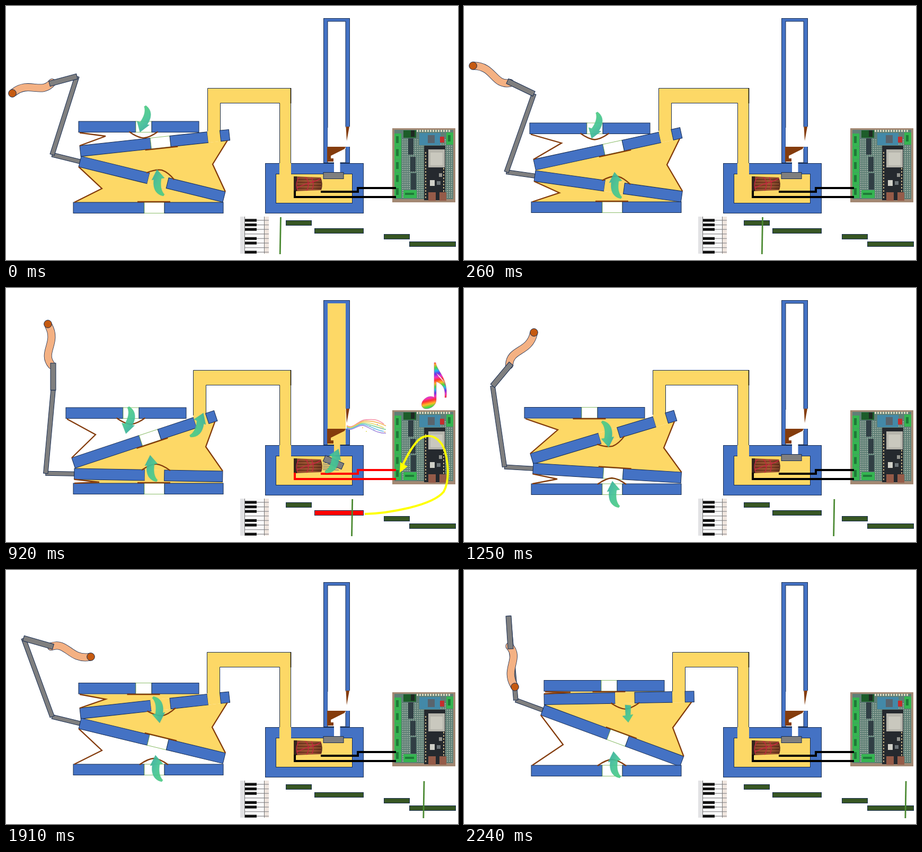
An HTML page that plays this animation: 853 px wide and 480 px high, repeating every 2.57 s.

```html
<!DOCTYPE html>
<html lang="en">
<head>
<meta charset="utf-8">
<title>Crank organ</title>
<style>
html, body { margin: 0; width: 100%; height: 100%; overflow: hidden; background: #fff; }
svg { display: block; width: 853px; height: 480px; }
</style>
</head>
<body>
<svg id="stage" viewBox="0 0 853 480" xmlns="http://www.w3.org/2000/svg"></svg>
<script>
const AIR = '#fdd866', BLUE = '#4472c4', NAVY = '#172c51', BROWN = '#843c0c', GRAY = '#7f7f7f';
const LOOP = 2570, FIRST = 260, STEP = 330, THICK = 20.5;

// Board poses are [left, top, angle]; folds are the inner tips of the bellows.
const poses = [
  { top: [137, 218], upper: [139, 264, -6.2], middle: [142, 284, 13.8], base: 371,
    folds: [[188, 246], [390, 299], [181, 345]], arm: [82, 147, 134, 133], knob: [12, 165],
    arrows: [[262, 215, 206], [287, 334, 0]] },
  { top: [124, 221], upper: [131, 290, -12.3], middle: [135, 311, 8], base: 370,
    folds: [[184, 259], [383, 300], [180, 353]], arm: [82, 142, 132, 166], knob: [17, 113],
    arrows: [[250, 227, 206], [286, 339, 0]] },
  { top: [114, 223.5], upper: [125, 311, -16.7], middle: [131, 330, 3.6], base: 369,
    folds: [[181, 270], [378, 300], [177, 360]], arm: [82, 140, 118, 188], knob: [42, 81],
    arrows: [[240, 238, 200], [285, 344, 0], [369, 266, 15, 1]] },
  { top: [113, 226], upper: [124, 321, -18.4], middle: [129, 341, 1], base: 369,
    folds: [[169, 277], [377, 300], [176, 367]], arm: [89, 142, 89, 193], knob: [79, 68],
    arrows: [[233, 251, 200], [274, 341, 0], [364, 260, 15, 1]] },
  { top: [114, 225.5], upper: [125, 313, -16.8], middle: [131, 331, 3.5], base: 370,
    folds: [[177, 268], [377, 302], [176, 361]], arm: [89, 143, 54, 185], knob: [132, 84],
    arrows: [[271, 276, 180], [282, 390, 0]] },
  { top: [123, 221], upper: [130, 291, -12.4], middle: [134, 311, 8], base: 368,
    folds: [[183, 257], [383, 299], [180, 352]], arm: [89, 144, 36, 169], knob: [153, 110],
    arrows: [[280, 270, 180], [283, 382, 0]] },
  { top: [137, 213.5], upper: [139, 261, -6.3], middle: [142, 280, 13.6], base: 367,
    folds: [[188, 244], [389, 297], [181, 341]], arm: [89, 145, 33, 129], knob: [160, 164],
    arrows: [[288, 264, 180], [284, 375, 0]] },
  { top: [151, 208.5], upper: [151, 234, -1], middle: [152, 255, 20.3], base: 369,
    folds: [[201, 231], [394, 298], [187, 330]], arm: [88, 149, 84, 87], knob: [96, 221],
    arrows: [[309, 271, 0, 0, 1], [284, 368, 0]] }
];

const rect = (x, y, w, h, fill, extra = '') =>
  `<rect x="${x}" y="${y}" width="${w}" height="${h}" fill="${fill}" ${extra}/>`;
const path = (d, fill = 'none', stroke = 'none', width = 1, extra = '') =>
  `<path d="${d}" fill="${fill}" stroke="${stroke}" stroke-width="${width}" ${extra}/>`;
const group = (transform, content) => `<g transform="${transform}">${content}</g>`;
const line = points => 'M' + points.map(p => p.join()).join('L');
const outlined = `stroke="${NAVY}"`;
const times = (n, make) => Array.from({ length: n }, (_, i) => make(i)).join('');

// A point given in board coordinates, placed on the stage.
function at([x, y, angle = 0], along, down) {
  const a = angle * Math.PI / 180, c = Math.cos(a), s = Math.sin(a);
  return [x + along * c - down * s, y + along * s + down * c];
}

// gaps: [start, end, holds air]
function board([x, y, angle = 0], length, gaps, flap) {
  let out = '', from = 0;
  for (const [start, end, air] of gaps) {
    out += rect(from, 0, start - from, THICK, BLUE, outlined);
    out += rect(start, 0, end - start, THICK, air ? AIR : '#fff', air ? '' : 'stroke="#70ad47" stroke-width=".8"');
    from = end;
  }
  out += rect(from, 0, length - from, THICK, BLUE, outlined);
  return group(`translate(${x} ${y}) rotate(${angle})`, out + flap);
}

// side is 1 for a flap below its board and -1 for one above.
function flap(center, side, open) {
  const y = side > 0 ? THICK + 1 : -1, edge = y - side * 2, bend = y + side * 9, tip = y + side * 10;
  const d = open
    ? `M${center - 27} ${edge}Q${center - 12} ${bend} ${center} ${tip}Q${center + 12} ${bend} ${center + 27} ${edge}`
    : `M${center - 31} ${y}H${center + 31}`;
  return path(d, 'none', BROWN, 2.3);
}

function bar(x1, y1, x2, y2, width) {
  const angle = Math.atan2(y2 - y1, x2 - x1) * 180 / Math.PI;
  return group(`translate(${x1} ${y1}) rotate(${angle})`,
    rect(0, -width / 2, Math.hypot(x2 - x1, y2 - y1), width, GRAY, outlined));
}

function airArrow([x, y, angle, flipped, short]) {
  const d = short
    ? 'M-5-16L6-15 5 3 10 2 1 17-10 5-4 4Z'
    : 'M-2-25L-12-5-8-6C-10 8-6 22 10 25L12 22C5 15 4 4 6-8L12-9Z';
  return group(`translate(${x} ${y}) rotate(${angle}) scale(${flipped ? -1 : 1} 1)`,
    path(d, 'url(#breeze)', '#46b98a', .5, 'opacity=".93"'));
}

function handle({ arm, knob, middle }) {
  const joint = at(middle, -54, THICK / 2), end = at(middle, 0, THICK / 2);
  const turn = Math.atan2(knob[1] - 145, knob[0] - 86) * 180 / Math.PI;
  const sleeve = 'M-1 0C25-18 40 16 74 1';
  const round = 'stroke-linecap="round"';
  return bar(...joint, ...end, 8) + bar(arm[2], arm[3], ...joint, 8.5) +
    group(`translate(86 145) rotate(${turn})`,
      path(sleeve, 'none', NAVY, 15, round) + path(sleeve, 'none', '#f4b183', 13.4, round)) +
    bar(...arm, 10) +
    `<circle cx="${knob[0]}" cy="${knob[1]}" r="7.3" fill="#c55a11" ${outlined}/>`;
}

function bellows(pose, falling) {
  const { top, upper, middle, base, folds } = pose;
  const bottom = [127, base];
  const topFold = [at(top, 2, THICK + 1), folds[0], at(upper, 0, 0)];
  const sideFold = [at(upper, 278, THICK), folds[1], at(middle, 280, 0)];
  const lowFold = [at(middle, 0, THICK), folds[2], at(bottom, 2, 0)];
  const crease = points => path(line(points), 'none', BROWN, 2.3);
  const room = points => path(line(points) + 'Z', AIR);
  const [ductX, ductTop] = at(upper, 254, 0);
  const left = Math.round(ductX) - 11.5, right = left + 24, ductY = ductTop + 12;
  const middleRoom = [at(upper, 0, THICK), ...sideFold, at(middle, 0, 0)];
  return room(middleRoom) +
    (falling
      ? room([...lowFold, at(bottom, 283, 0), at(middle, 280, THICK)])
      : room([...topFold, at(upper, 230, 0), at(top, 227, THICK)])) +
    path(`M${left} ${ductY}V155H538V318H516V183H${right}V${ductY}Z`, AIR) +
    path(`M${left} ${ductTop}V155.5H537.5V297M516.5 297V183.5H${right}V${ductTop}`, 'none', NAVY, 1) +
    path('M537.5 155V184', 'none', '#000', 1.5) +
    board(top, 227, [[108, 138, false]], flap(122.5, 1, falling)) +
    board(upper, 283, [[134, 171, !falling], [242, 266, true]], flap(153, 1, !falling)) +
    board(middle, 280, [[133, 170, falling]], flap(154, -1, falling)) +
    board(bottom, 283, [[134, 172, false]], flap(152, -1, !falling)) +
    [topFold, sideFold, lowFold].map(crease).join('');
}

function pipe(sounding) {
  const fill = sounding ? AIR : '#fff';
  return rect(599.5, 23.5, 49, 273, BLUE, outlined) +
    rect(607, 29, 34, 267, fill, sounding ? '' : outlined) +
    rect(640.5, 228, 10, 38, '#fff') + rect(607, 230, 34, 40, fill) +
    rect(619, 290, 11.5, 26, fill) +
    path('M641.5 228H648L643 255Z', BROWN) +
    path('M606 266H641L639 270 613 283V288H618V294H606Z', BROWN) +
    group(sounding ? 'translate(618 329.5) rotate(24)' : 'translate(618 320.5)',
      rect(-19, -6, 38, 12, GRAY, outlined));
}

function coil(live) {
  const wire = live ? '#f00' : '#000';
  return path('M543 322L594 324Q599 336 595 348L543 350Z', 'url(#copper)') + rect(543, 322, 6, 28, '#35251e') +
    times(9, i => path(`M549 ${325 + i * 2.8}H595`, 'none', i % 2 ? '#5e2b18' : '#b0643c', .9)) +
    path('M550 348C546 336 550 324 555 325M567 349C574 340 570 326 564 324M549 344C562 336 580 334 594 326M576 324C582 334 580 344 577 347',
      'none', '#c4263f', 1.5) +
    path('M594 351H664V344H736M545 349V361H736', 'none', wire, 4) +
    (live ? times(5, i => path(`M598 ${331 + i * 3}L${616 + i * 3} ${330 + i * 3.5}`, 'none', '#4c5b83', 1)) : '');
}

function sound() {
  const tints = ['#f58fa4', '#f5b65c', '#e4dc66', '#7fcf9a', '#70bde8', '#a58ade'];
  const ribbon = tints.map((tint, i) =>
    path(`M643 ${260 + i}C655 ${268 + i} 664 ${250 + i} 678 ${249 + i * 2.4}S700 ${247 + i * 5.5} ${713 + i % 2 * 4} ${257 + i * 3.5}`, 'none', tint, 1.6)).join('');
  const sparks = times(8, i => `<circle cx="${666 + i * 7}" cy="${257 + i * 7 % 17}" r="1.1" fill="${tints[i % 6]}"/>`);
  const note = path('M808 141H811C813 157 835 170 831 207H828C830 187 822 181 812 177V211C812 223 799 230 790 228 780 224 784 211 796 206 801 204 806 205 808 207ZM812 160C817 171 826 174 829 184 827 174 819 167 812 160Z', 'url(#rainbow)', '#c43b7a', .5, 'fill-rule="evenodd"');
  const signal = path('M677 427C720 426 804 412 826 385 840 360 833 306 820 292 808 276 788 275 774 292 762 306 754 323 748 336', 'none', '#ff0', 4) +
    path('M743 349L744 329 750 333 758 337Z', '#ff0');
  return ribbon + sparks + note + signal;
}

function circuitBoard() {
  const terminal = (x, y, w, h) => rect(x, y, w, h, '#35b551') + rect(x + 3, y + 5, w - 8, h - 11, '#1f7a38');
  const pins = i => rect(791, 276 + i * 6, 2, 3, '#c3b183') + rect(825, 276 + i * 6, 2, 3, '#c3b183');
  return rect(729, 231, 119, 140, '#a38873') + rect(733, 234, 111, 131, '#5f7f76') +
    rect(746, 250, 97, 114, 'url(#holes)') +
    path('M775 236H838', 'none', '#d6d5bd', 4, 'stroke-dasharray="3 2"') +
    times(5, i => terminal(733, 241 + i * 24.5, 13, 24)) +
    rect(750, 235, 24, 14, '#1d5d2a') + rect(764, 235, 7, 12, '#202923') +
    terminal(831, 239, 13, 23) + terminal(750, 348, 25, 15) +
    rect(780, 240, 40, 23, '#4389a8') + rect(796, 244, 13, 15, '#59646d') + rect(819, 247, 8, 11, '#c62d2d') +
    rect(759, 250, 10, 31, '#303e44') + rect(763, 285, 10, 28, '#303e44') + rect(764, 316, 10, 31, '#303e44') +
    rect(789, 264, 40, 103, '#25292e') + times(15, pins) +
    rect(797, 271, 31, 34, '#b6b5ac') + rect(801, 277, 23, 24, '#c9c8be') +
    rect(800, 329, 9, 11, '#d0d0c8') + rect(817, 316, 6, 7, '#91928d') + rect(813, 331, 7, 7, '#6d7478') +
    rect(797, 352, 14, 16, '#955b48') + rect(818, 352, 13, 16, '#955b48');
}

function keyboard() {
  const pitch = 8.6, blackKeys = [0, 1, 2, 4, 5, 7];
  return rect(442, 398, 54, 70, '#e2e2e4') + rect(450, 398, 37, 70, '#fafafa') + rect(487, 398, 9, 70, '#f0e6df') +
    times(8, i => rect(450, 404.3 + i * pitch, 46, 1.4, '#99979a')) +
    blackKeys.map(i => rect(450, 402.4 + i * pitch, 23, 5.2, '#111')).join('') +
    path('M450.5 398V468M487.5 398V468', 'none', '#777', 1);
}

function score(step, live) {
  const notes = [[528, 405, 48], [582, 420, 92], [713, 431, 48], [761, 445, 87]];
  const x = 518 + step * 45.1;
  return notes.map(([left, y, w], i) =>
    rect(left + .5, y + .5, w, 9, live && i === 1 ? '#f00' : '#375623', outlined)).join('') +
    path(`M${x + .4} 399L${x - .8} 469`, 'none', '#4b8a32', 2.8);
}

const defs = `<defs>
  <linearGradient id="breeze" x2="1" y2="1"><stop stop-color="#35a8a0"/><stop offset=".5" stop-color="#45c496"/><stop offset="1" stop-color="#4fcf80"/></linearGradient>
  <linearGradient id="copper"><stop stop-color="#6e3620"/><stop offset=".6" stop-color="#9a5230"/><stop offset="1" stop-color="#5a2e1c"/></linearGradient>
  <linearGradient id="rainbow" gradientUnits="userSpaceOnUse" x1="800" y1="141" x2="808" y2="175" spreadMethod="repeat">
  ${['#f33', '#fb2', '#4d4', '#2be', '#63e', '#e3c', '#f33'].map((c, i) => `<stop offset="${i / 6}" stop-color="${c}"/>`).join('')}
  </linearGradient>
  <pattern id="holes" width="4" height="4" patternUnits="userSpaceOnUse">${rect(0, 0, 2, 2, '#a3b3a6')}</pattern></defs>`;

const chest = rect(489.5, 297.5, 185, 94, BLUE, outlined) + rect(509.5, 317.5, 144, 55, AIR, outlined);
const stage = document.getElementById('stage');
stage.innerHTML = defs + chest + circuitBoard() + keyboard() + '<g id="scene"></g>';
const scene = document.getElementById('scene');

function draw(step) {
  const pose = poses[step], falling = step < 4, live = step === 2 || step === 3;
  const arrows = live ? [...pose.arrows, [619, 328, 15, 1]] : pose.arrows;
  scene.innerHTML = pipe(live) + handle(pose) + bellows(pose, falling) + coil(live) +
    arrows.map(airArrow).join('') + score(step, live) + (live ? sound() : '');
}

let shown = -1;
const began = performance.now();
function tick() {
  const t = (performance.now() - began) % LOOP;
  const step = t < FIRST ? 0 : Math.min(poses.length - 1, 1 + Math.floor((t - FIRST) / STEP));
  if (step !== shown) draw(shown = step);
  requestAnimationFrame(tick);
}
tick();
</script>
</body>
</html>
```
